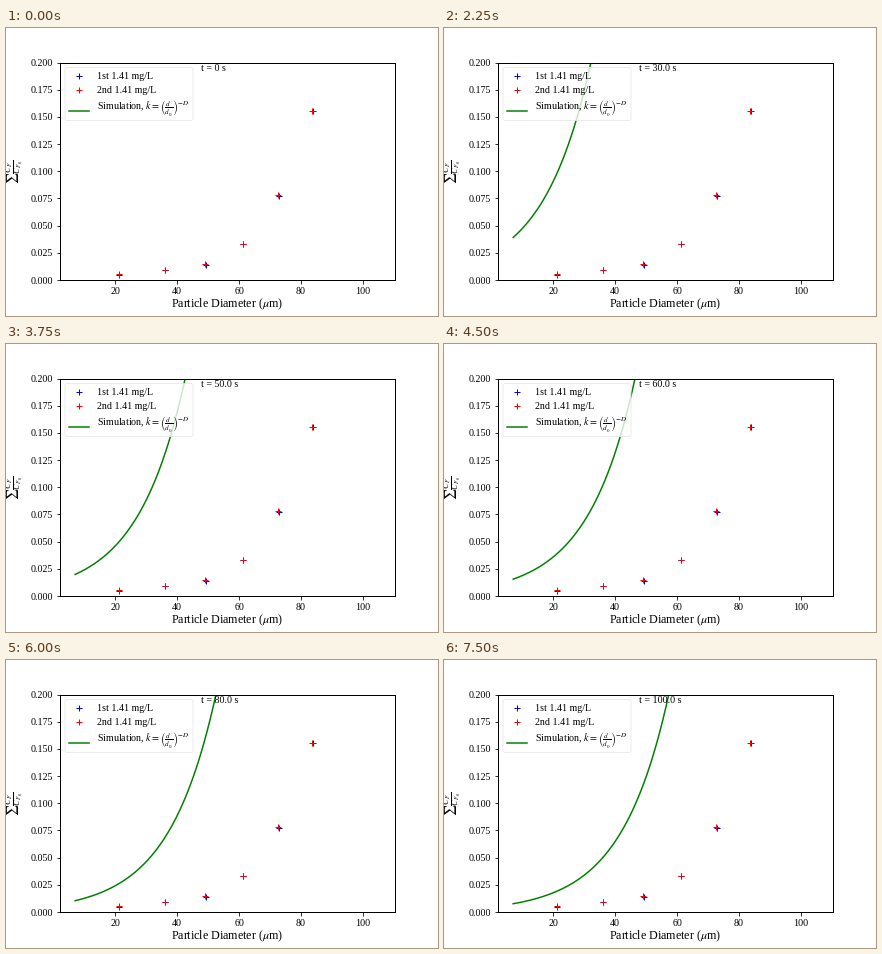
These frames come from a looping animation (432x288 px, 8000 ms). A matplotlib script:

```python
import numpy as np
import matplotlib.pyplot as plt
from matplotlib.animation import FuncAnimation
from matplotlib.patches import FancyBboxPatch

plt.rcParams.update({
    "font.family": "Liberation Serif",
    "mathtext.fontset": "stix",
    "font.size": 10,
    "axes.labelsize": 12,
    "axes.linewidth": 1,
    "text.kerning_factor": 6,
})

W, H, DPI = 432, 288, 72
STEP = 10         # seconds of simulated time per update
HOLD = 3          # animation frames per update
FRAMES = 32
RATE, ORDER, GROWTH = 0.277, 1.453, 0.065

size = np.linspace(7, 105.4, 300)


def remaining(t):
    return (1 + RATE * t) ** -ORDER * np.exp(GROWTH * (size - size[0]))


fig, ax = plt.subplots(figsize=(W / DPI, H / DPI), dpi=DPI)
fig.subplots_adjust(left=0.125, right=0.9, bottom=0.125, top=0.88)

first_x = [21.2, 36.05, 49.3, 61.3, 72.9, 83.85]
first_y = [0.0046, 0.0092, 0.0138, 0.0331, 0.0771, 0.1555]
second_x = [21.2, 36.05, 49.0, 61.3, 72.6, 83.55]
second_y = [0.0053, 0.0092, 0.0145, 0.0331, 0.0779, 0.1555]

ax.plot(first_x, first_y, "+", color="blue")
ax.plot(second_x, second_y, "+", color="red")
curve, = ax.plot(size, remaining(0), color="green", lw=1.5)

ax.set_xlim(2.1, 110.3)
ax.set_ylim(0, 0.2)
ax.set_xlabel(r"Particle Diameter ($\mu$m)", labelpad=1)
ax.set_ylabel(r"$\sum \frac{C_F}{C_{F_0}}$")
clock = ax.text(0.42, 0.96, "", transform=ax.transAxes)

# Legend, laid out in pixels from the top left corner
key = fig.add_axes([0, 0, 1, 1], xlim=(0, W), ylim=(H, 0))
key.axis("off")
key.add_patch(FancyBboxPatch((61, 41.5), 124, 49, boxstyle="round,pad=2",
                             fc="white", ec="0.9", alpha=0.8))
key.plot(73, 48, "+", color="blue")
key.plot(73, 62, "+", color="red")
key.plot([63, 83], [83, 83], color="green", lw=1.5)
key.text(91, 51, "1st 1.41 mg/L")
key.text(91, 65, "2nd 1.41 mg/L")
key.text(91, 82, r"Simulation, $k = \left(\frac{d}{d_0}\right)^{-D}$")


def update(i):
    t = i // HOLD * STEP
    curve.set_ydata(remaining(t))
    clock.set_text(f"t = {float(t)} s" if t else "t = 0 s")
    return curve, clock


anim = FuncAnimation(fig, update, frames=FRAMES, interval=250,
                     repeat=True, repeat_delay=0)
plt.show()
```
